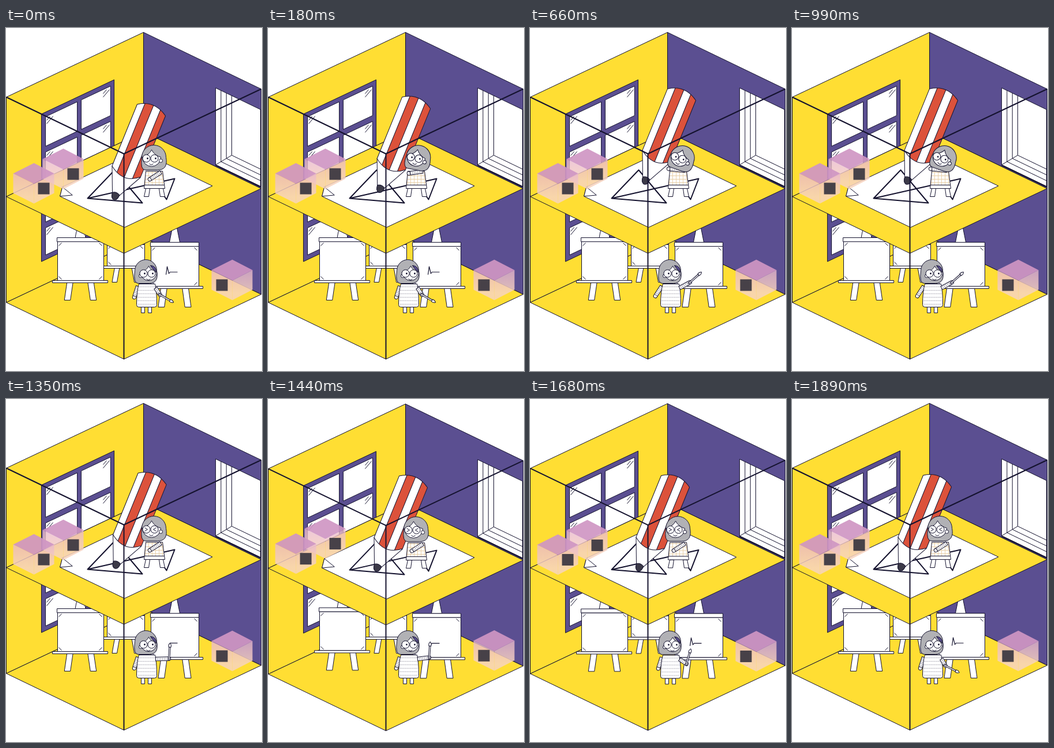
An HTML page with a canvas for the animation above (1.92 s loop, 444 by 593 pixels).

```html
<!DOCTYPE html>
<html lang="en">
<head>
<meta charset="utf-8">
<title>Design studio</title>
<style>
html, body { margin: 0; width: 100%; height: 100%; overflow: hidden; background: #fff; }
canvas { display: block; }
</style>
</head>
<body>
<canvas id="stage" width="444" height="593"></canvas>
<script>
const ctx = document.getElementById('stage').getContext('2d');
const INK = '#15132f', YELLOW = '#ffde33', PURPLE = '#5b4f91', RED = '#dc523b',
  HAIR = '#b1b1b5', WHITE = '#fff';
const LOOP = 1920, STEP = 30, HIT = 1370;
const FLOOR = 172, GROUND = 355;

// Drawing helpers

function paint(path, fill, stroke = INK, width = 1) {
  if (fill) { ctx.fillStyle = fill; ctx.fill(path); }
  if (stroke) { ctx.strokeStyle = stroke; ctx.lineWidth = width; ctx.stroke(path); }
}
const shape = (d, ...style) => paint(new Path2D(d), ...style);
const poly = (pts, ...style) => shape('M' + pts.join(' ') + 'Z', ...style);
const line = (pts, width = 1, color = INK) => shape('M' + pts.join(' '), null, color, width);
const box = (x, y, w, h, ...style) => shape(`M${x} ${y}h${w}v${h}h${-w}Z`, ...style);
const dot = (x, y, r, ...style) =>
  shape(`M${x - r} ${y}a${r} ${r} 0 0 1 ${2 * r} 0a${r} ${r} 0 0 1 ${-2 * r} 0`, ...style);
function at(x, y, angle, draw) {
  ctx.save();
  ctx.translate(x, y);
  ctx.rotate(angle);
  draw();
  ctx.restore();
}
// Fills a path, draws details inside it, then outlines it.
function filled(d, fill, details) {
  const path = new Path2D(d);
  paint(path, fill, null);
  ctx.save();
  ctx.clip(path);
  details();
  ctx.restore();
  paint(path);
}

// Room coordinates: a runs to the left corner, b to the right one, z downwards.
const iso = (a, b, z) => [205 - 204 * a + 238 * b, 218 - 98 * a - 112 * b + z];
const onLeft = (b, z) => iso(1, b, z);
const onRight = (a, z) => iso(a, 1, z);
const onFloor = z => (a, b) => iso(a, b, z);
const quad = (plane, u, v, u2, v2, ...style) =>
  poly([plane(u, v), plane(u2, v), plane(u2, v2), plane(u, v2)], ...style);

// Motion helpers

const mix = (a, b, k) => a + (b - a) * k;
const mixPoint = (p, q, k) => p.map((v, i) => mix(v, q[i], k));
const clamp = u => Math.min(1, Math.max(0, u));
const part = (t, from, to) => clamp((t - from) / (to - from));
function ramp(t, from, to) {
  const u = part(t, from, to);
  return u * u * (3 - 2 * u);
}
const pencilLift = t => 1 - (1 - part(t, 0, 660)) ** 2 - part(t, 1110, HIT) ** 2;
function roomShake(t) {
  const n = (t - HIT) / 72;
  return n < 0 ? 0 : 32 * Math.exp(-0.95 * n) * Math.sin(Math.PI * n);
}
function hop(t) {
  const u = part(t, 1400, 1650);
  return 4 * u * (1 - u);
}

// Room

function storey(top, bottom) {
  quad(onLeft, 0, top, 1, bottom, YELLOW);
  quad(onRight, 0, top, 1, bottom, PURPLE);
}

function leftWindow(top, bottom) {
  quad(onLeft, .256, top, .786, bottom, PURPLE);
  for (const [u, u2, glint] of [[.286, .517, 2], [.546, .76, 38]]) {
    for (const z of [top + 8, top + 69]) {
      quad(onLeft, u, z, u2, Math.min(z + 51, bottom - 8), WHITE);
      const [x, y] = onLeft(u, z);
      const low = y + 13 - glint * .47;
      line([x + glint, low, x + glint + 11, low - 13]);
      line([x + glint, low - 6, x + glint + 6, low - 13]);
    }
  }
}

function rightWindow() {
  const sill = i => [.387 - i * .0457, 169 - i * 10];
  quad(onRight, .387, 36, .005, 169, WHITE);
  for (let i = 1; i < 4; i++) {
    const [a, z] = sill(i);
    line([onRight(a, 36), onRight(a, z), onRight(.005, z)]);
  }
  line([onRight(...sill(3)), onRight(...sill(0)), onRight(.005, 169)]);
  line([onRight(.387, 169.5), onRight(.005, 169.5)], 2);
}

function sheet() {
  const p = onFloor(FLOOR);
  const cutA = p(.85, .28), cutB = p(.777, .2);
  poly([p(.228, .2), cutB, cutA, p(.85, .84), p(.228, .84)], WHITE);
  poly([cutA, p(.735, .255), cutB], WHITE);
  line([268, 281, 279, 297, 293, 261, 142, 295, 189, 246, 237, 303, 142, 295], 2);
}

function easel(mid, y, w, h, leg) {
  const k = w / 82, left = mid - w / 2, bottom = y + 7 + h;
  poly([mid - 4, y - 25, mid + 4, y - 25, mid + 9, y, mid - 9, y], WHITE);
  for (const side of [-1, 1]) {
    at(mid, bottom, 0, () => {
      ctx.scale(side, 1);
      shape(`M${12.5 * k} 0H${23 * k}l5 ${leg}h${-10.5 * k}Z`, WHITE);
    });
  }
  box(left, y, w, 7, WHITE);
  box(left + 1, y + 7, w - 1, h, WHITE);
  for (const side of [-1, 1]) {
    const x = mid + side * (w / 2 - 3);
    line([x, y + 14, x - side * 5, y + 9]);
    line([x, bottom - 7, x - side * 5, bottom - 2]);
  }
  box(left - 8, bottom, w + 15, 4, WHITE);
}

function cube(x, y, badgeX) {
  at(x, y, 0, () => {
    const side = ctx.createLinearGradient(0, 18, 0, 58);
    side.addColorStop(0, 'rgba(234,184,204,.78)');
    side.addColorStop(1, 'rgba(247,212,190,.86)');
    for (const w of [-36, 35]) shape(`M0 36L${w} 18v34L0 70Z`, side, null);
    shape('M0 0L35 18L0 36L-36 18Z', 'rgba(208,150,196,.92)', null);
    box(badgeX - 10, 34, 20, 20, '#474148', null);
  });
}

function pencil(lift) {
  at(228, 132.5, .388, () => {
    ctx.translate(0, -29 * lift);
    shape('M0 115L19 160H30L53 115Z', WHITE);
    shape('M18 157Q24 153 31 157Q31 168 24 168Q18 166 18 157Z', '#3c3a48');
    filled('M0 0Q26 -18 53 0V114Q28 136 0 115Z', WHITE, () => {
      for (const [x, w] of [[12, 15], [41, 14]]) box(x, -30, w, 180, RED);
    });
  });
}

// People

function head(x, y, w, faceX, faceY, r, earSide, shut) {
  at(x, y, 0, () => {
    shape(`M${-w} 0A${w} ${w} 0 0 1 ${w} 0Q${w + 4} 22 ${w * .3} 22H${-w * .7}Q${-w - 3} 22 ${-w} 0Z`, HAIR);
    ctx.translate(faceX, faceY);
    const brow = -.2 * r;
    shape(`M${-r} ${brow}Q${-.2 * r} ${-.5 * r} 0 ${-r}Q${.3 * r} ${-.4 * r} ${r} ${brow}A${r} ${r} 0 0 1 ${-r} ${brow}`, WHITE);
    dot(earSide * r, 3, 3, WHITE);
    for (const side of [-1, 1]) {
      const eye = side * 7 - 2;
      dot(eye, -1, 6.5, WHITE);
      if (shut) line([eye + side * 3, -4, eye - side * 2, -1, eye + side * 3, 2]);
      else dot(eye + 2, -1, 1.4, INK, null);
    }
    shape('M-4 8Q0 12 3 8');
  });
}

function sleeve([x1, y1], [x2, y2]) {
  const length = Math.hypot(x2 - x1, y2 - y1);
  at(x1, y1, Math.atan2(y2 - y1, x2 - x1), () => {
    dot(length, 0, 3.2, WHITE);
    box(0, -3.2, length - 2, 6.4, WHITE);
    for (let x = 3; x < length - 2; x += 3) line([x, -3, x, 3], 1, '#a3a1ad');
  });
}

function upperGirl(t) {
  const lean = ramp(t, 0, 330) - ramp(t, 1110, 1320);
  const arm = () => sleeve([269, mix(250, 247, lean)], mixPoint([250, 262], [241, 244], lean));
  for (const side of [-1, 1])
    shape(`M${258 + side * 15} 278h${-side * 7}l${side * 2} 14h${side * 8}Z`, WHITE);
  filled('M243 248H272L276 278H240Z', WHITE, () => {
    for (let i = 0; i < 42; i += 6) {
      line([242 + i, 246, 242 + i, 272], 1, '#e8cfa8');
      line([238, 250 + i, 278, 250 + i], 1, '#e8cfa8');
    }
    box(238, 272, 40, 8, WHITE);
  });
  if (lean > .3) arm();
  at(258, 246, lean * .35, () => head(-1, -22, 21, -4, 3, 16, 1, t > 1200));
  if (lean <= .3) arm();
}

const STROKE = [[298, 422.5], [285, 422.5], [283, 425], [280, 413], [278, 427]];

// The first part of STROKE, up to the given share of its length.
function drawn(share) {
  const gap = i => Math.hypot(STROKE[i][0] - STROKE[i - 1][0], STROKE[i][1] - STROKE[i - 1][1]);
  let left = share * STROKE.reduce((sum, _, i) => i ? sum + gap(i) : 0, 0);
  const pts = [STROKE[0]];
  for (let i = 1; i < STROKE.length && left > 0; left -= gap(i++))
    pts.push(mixPoint(STROKE[i - 1], STROKE[i], clamp(left / gap(i))));
  return pts;
}
const strokeAt = t => drawn(part(t, 1020, 1620) ** 2);

function drawing(t) {
  ctx.save();
  ctx.globalAlpha = t < 1020 ? 1 - part(t, 360, 520) : 1;
  line(t < 1020 ? STROKE : strokeAt(t), 1.2);
  ctx.restore();
}

function lowerGirl(t) {
  const raise = ramp(t, 360, 570) - ramp(t, 1620, LOOP);
  const reach = ramp(t, 330, 570) - ramp(t, 1020, 1320);
  const tip = mixPoint([291, 475], strokeAt(t).pop(), raise);
  const angle = mix(.52, mix(-.72, -1.5, ramp(t, 1020, 1350)), raise);
  const hand = [tip[0] - 27 * Math.cos(angle), tip[1] - 27 * Math.sin(angle)];

  for (const x of [235, 247]) box(x, 483, 6, 10, WHITE);
  sleeve([229, 447], mixPoint([223, 466], [218, 464], reach));
  filled('M231 443H259Q262 456 262 479Q262 483 258 483H231Q227 483 227 479Q227 456 231 443Z', WHITE, () => {
    ctx.setLineDash([2, 1]);
    for (let y = 448; y < 482; y += 6) line([229, y, 260, y], 1, '#aeacb7');
  });
  head(243, 420, 19, 5, 6, 14, -1, false);
  shape('M251 411Q261 412 261 422Q255 418 251 411Z', PURPLE);

  sleeve([260, 450], hand);
  at(...tip, angle, () => {
    box(-30, -1.2, 23, 2.4, WHITE);
    shape('M-7 -2Q-3 -3 0 0Q-3 3 -7 2Z', WHITE);
  });
}

// Scene

function render(t) {
  const jump = hop(t);
  const hopping = (height, draw) => at(0, -height * jump, 0, draw);

  ctx.fillStyle = WHITE;
  ctx.fillRect(0, 0, 444, 593);
  at(-.5, roomShake(t) - .5, 0, () => {
    storey(FLOOR, GROUND);
    quad(onFloor(GROUND), 0, 0, 1, 1, YELLOW);
    leftWindow(189, 313);
    hopping(2, () => easel(208, 368, 66, 37, 28));
    hopping(5, () => easel(129.5, 363, 81, 67, 34));
    hopping(1.5, () => {
      easel(293, 371, 84, 69, 36);
      drawing(t);
    });

    storey(0, FLOOR);
    leftWindow(58, FLOOR + 8);
    rightWindow();
    quad(onFloor(FLOOR), 0, 0, 1, 1, YELLOW);
    sheet();
    pencil(pencilLift(t));

    line([iso(0, 0, 0), iso(0, 0, GROUND)], 2);
    line([iso(1, 0, 0), iso(0, 0, 0), iso(0, 1, 0)], 2);

    upperGirl(t);
    hopping(2, () => lowerGirl(t));
    hopping(6.5, () => cube(100, 209, 17));
    hopping(4.5, () => cube(49, 234, 17));
    hopping(3.5, () => cube(393, 401, -18));
  });
}

ctx.lineJoin = 'round';
const start = performance.now();
function tick() {
  const t = (performance.now() - start) % LOOP;
  render(Math.floor(t / STEP) * STEP);
  requestAnimationFrame(tick);
}
tick();
</script>
</body>
</html>
```
